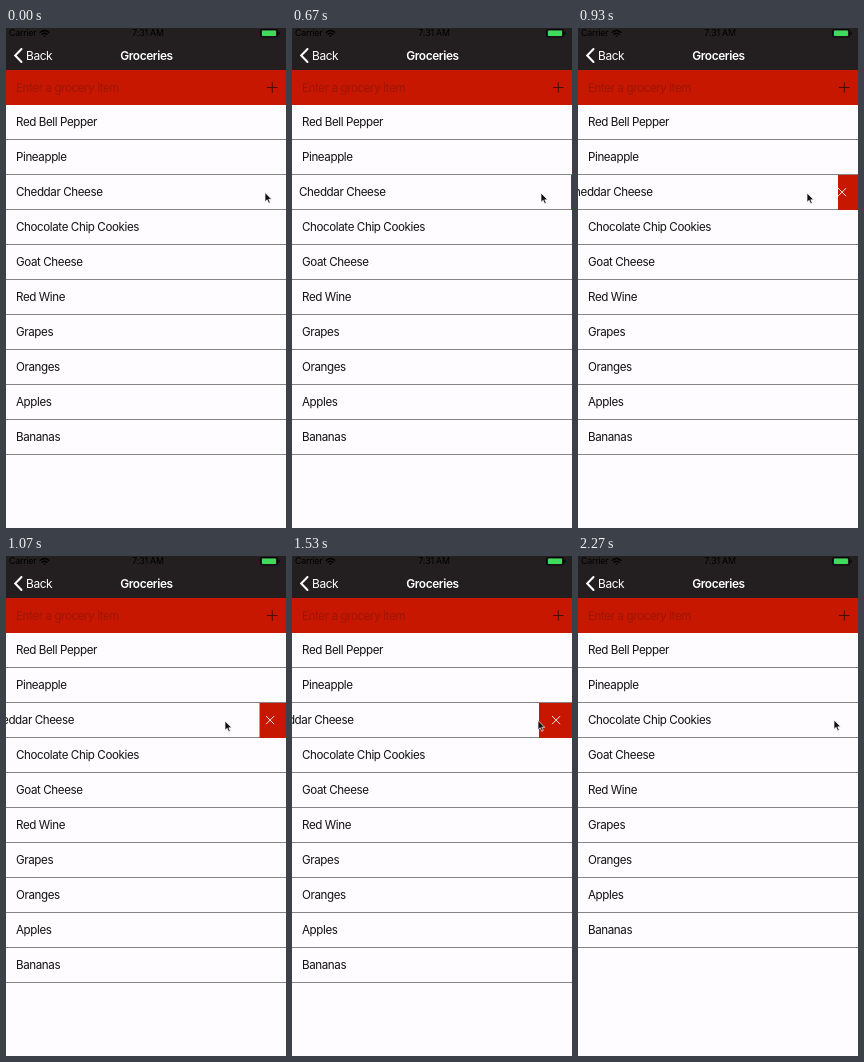
Animation of 280 by 500 pixels, one loop 2590 ms. Source, as an HTML page:

```html
<!DOCTYPE html>
<html lang="en">
<head>
<meta charset="utf-8">
<title>Groceries</title>
<style>
  html, body { margin: 0; width: 100%; height: 100%; overflow: hidden; background: #fefcfe; }
  svg { display: block; width: 280px; height: 500px; }
  text { font: 11.6px Inter, Roboto, sans-serif; letter-spacing: -.4px; fill: #111; }
  .nav { font-size: 11.9px; fill: #fff; }
  .title { font-weight: 600; text-anchor: middle; }
  .status { font-size: 8.8px; letter-spacing: -.2px; fill: #000; }
  .hint { fill: #9c1606; }
  .stroke { fill: none; stroke-linecap: round; }
</style>
</head>
<body>
<svg viewBox="0 0 280 500">
  <rect width="280" height="500" fill="#fefcfe"/>
  <rect x="247" y="147" width="33" height="35" fill="#c81700" id="button"/>
  <path id="cross" class="stroke" d="M260.3 160.3l7.6 7.6m0-7.6l-7.6 7.6" stroke="#fbe5e2"/>
  <g id="rows"></g>

  <rect width="280" height="42" fill="#231f20"/>
  <text class="status" x="3" y="8.3">Carrier</text>
  <g class="stroke" stroke="#000" stroke-width="1.4">
    <path d="M34.3 4.2q4.2-3.6 8.4 0M36 6.2q2.500-2 5 0M38.200 8h.6"/>
  </g>
  <text class="status" x="142" y="8.3" text-anchor="middle">7:31 AM</text>
  <rect x="254.500" y="1.500" width="17" height="7.500" rx="1.500" fill="none" stroke="#000" stroke-width=".8"/>
  <rect x="256" y="2.500" width="14" height="5.500" rx=".8" fill="#3fdb5c"/>
  <path d="M273 3.800v3" stroke="#000"/>
  <path class="stroke" d="M15.500 21l-6.300 6.500 6.300 6.500" stroke="#fff" stroke-width="2"/>
  <text class="nav" x="20" y="31.500">Back</text>
  <text class="nav title" x="140.500" y="31.500">Groceries</text>

  <rect y="42" width="280" height="35" fill="#c81700"/>
  <text class="hint" x="10" y="63.500">Enter a grocery item</text>
  <path d="M261 59.500h10.500M266.300 54.300v10.500" stroke="#4a0c04"/>

  <path id="cursor" d="M0 0V9.300L2.200 7.300 3.700 10.800 5.300 10.100 3.800 6.800H6.700Z"
        fill="#111" stroke="#fff" stroke-width=".7"/>
</svg>
<script>
const LOOP = 2590, TICK = 200 / 3;
const ROW = 35, TOP = 77, SWIPED = 2, REMOVED_AT = 32;
const items = ["Red Bell Pepper", "Pineapple", "Cheddar Cheese", "Chocolate Chip Cookies",
  "Goat Cheese", "Red Wine", "Grapes", "Oranges", "Apples", "Bananas"];

// Tracks are [tick, value] pairs, linear in between.
const cursorX = [[0, 259], [3, 259], [4, 258.4], [7, 258.4], [8, 258], [10, 249], [12, 236],
  [14, 229], [18, 209], [20, 212], [23, 246], [26, 256], [29, 256], [30, 255], [33, 255], [34, 256]];
const cursorY = [[0, 164.5], [10, 165], [20, 165], [26, 164], [30, 164], [34, 164]];
const swipe = [[8, 0], [10, 3], [12, 13], [14, 22], [18, 35]];

function at(track, tick) {
  const next = track.findIndex(([t]) => t > tick);
  if (next < 0) return track[track.length - 1][1];
  if (next === 0) return track[0][1];
  const [t0, v0] = track[next - 1], [t1, v1] = track[next];
  return v0 + (v1 - v0) * (tick - t0) / (t1 - t0);
}

const $ = id => document.getElementById(id);
$("rows").innerHTML = items.map(name => `<g>
  <rect width="282" height="34" fill="#fefcfe"/>
  <rect y="34" width="282" height="1" fill="#858385"/>
  <text x="10" y="21">${name}</text></g>`).join("");
const rows = [...$("rows").children];

const place = (el, x, y) => el.setAttribute("transform", `translate(${x} ${y})`);
const show = (el, visible) => el.setAttribute("visibility", visible ? "visible" : "hidden");

function draw(ms) {
  const tick = Math.floor((ms % LOOP + 4) / TICK);
  const removed = tick >= REMOVED_AT;
  rows.forEach((row, i) => {
    const slot = removed && i > SWIPED ? i - 1 : i;
    place(row, i === SWIPED ? -at(swipe, tick) : 0, TOP + ROW * slot);
  });
  show(rows[SWIPED], !removed);
  show($("button"), !removed);
  show($("cross"), !removed);
  place($("cursor"), at(cursorX, tick), at(cursorY, tick));
}

const start = performance.now();
function loop() {
  draw(performance.now() - start);
  requestAnimationFrame(loop);
}
loop();
</script>
</body>
</html>
```
